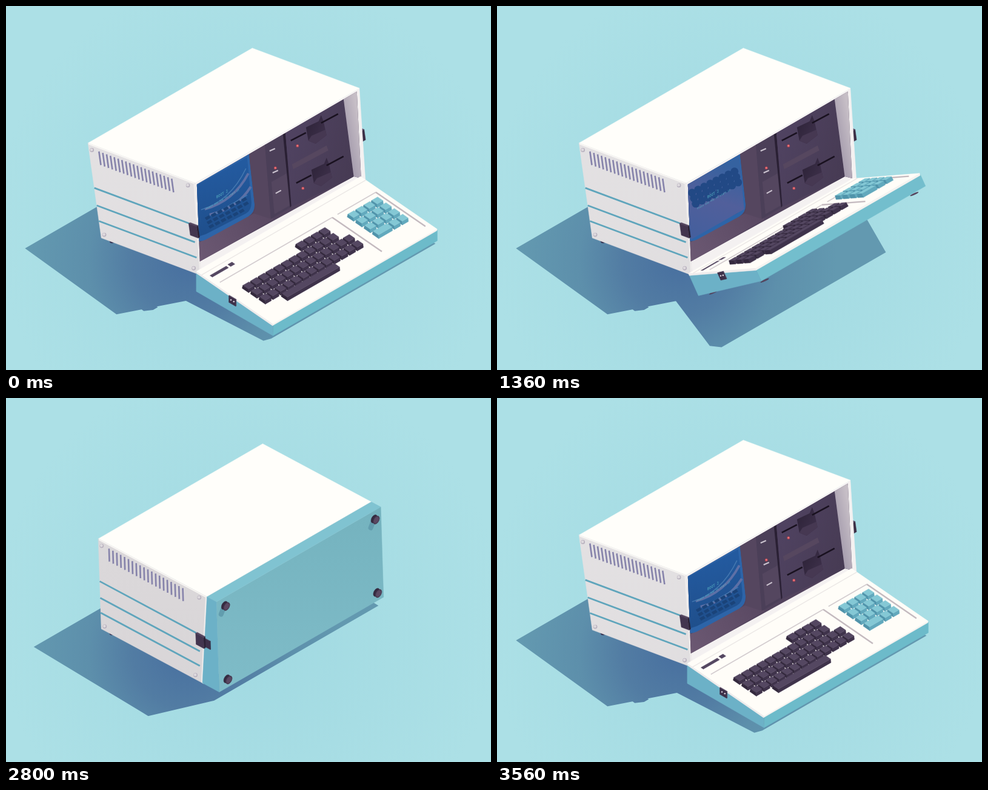
An HTML page with a canvas that plays this animation: 800 px wide and 600 px high, repeating every 4.16 s.

```html
<!DOCTYPE html>
<html lang="en">
<head>
<meta charset="utf-8">
<title>Portable computer</title>
<style>
  html, body { margin: 0; width: 100%; height: 100%; overflow: hidden; background: #abdfe5; }
  canvas { display: block; }
</style>
</head>
<body>
<canvas id="stage" width="800" height="600"></canvas>
<script>
const ctx = document.getElementById('stage').getContext('2d');
const LOOP = 4160, STEP = 40, WIDTH = 313;
const DARK = { top: '#544761', cap: '#33283d', front: '#3f334b' };
const TEAL = { top: '#84c8d5', cap: '#4f93aa', front: '#62a9bd' };
const BODY = [[0, 0], [193, 0], [207, 146], [0, 146]];
const LID = [[193, 0], [225, 0], [225, 146], [207, 146]];
const LATCH = box(186, 61, 201, 79);
let tilt = 10, swing = 100;

const clamp = (x, lo, hi) => Math.min(hi, Math.max(lo, x));

// World axes: a runs up-right, b runs down-right, z is height.
const project = ([a, b, z]) => [157 + .866 * (a + b), 380 + (b - a) / 2 - z];

function rotate([b, z], [cb, cz], degrees) {
  const r = degrees * Math.PI / 180, c = Math.cos(r), s = Math.sin(r);
  b -= cb; z -= cz;
  return [cb + b * c - z * s, cz + b * s + z * c];
}

// Each part places its own (b, z) profile in the world.
const onBody = p => rotate(p, [13, 0], tilt);
const onLid = p => onBody(rotate(p, [189.6, 4.9], -swing));
const onKeys = ([v, h]) => onLid([193 + .095 * v - .995 * h, .995 * v + .095 * h]);
const at = (place, a, b, z) => project([a, ...place([b, z])]);

function box(b0, z0, b1, z1) { return [[b0, z0], [b1, z0], [b1, z1], [b0, z1]]; }

function trace(points) {
  ctx.beginPath();
  points.forEach(p => ctx.lineTo(...p));
}
function fill(points, color) {
  trace(points);
  ctx.closePath();
  ctx.fillStyle = ctx.strokeStyle = color;
  ctx.fill();
  ctx.lineWidth = .5;
  ctx.stroke();
}
function line(points, color, width, cap = 'butt') {
  trace(points);
  ctx.strokeStyle = color;
  ctx.lineWidth = width;
  ctx.lineCap = cap;
  ctx.stroke();
}
function shape(path, color) {
  ctx.fillStyle = color;
  ctx.fill(new Path2D(path));
}
function stroke(path, color, width) {
  ctx.strokeStyle = color;
  ctx.lineWidth = width;
  ctx.stroke(new Path2D(path));
}
function dot(x, y, r, color) {
  ctx.beginPath();
  ctx.arc(x, y, r, 0, 7);
  ctx.fillStyle = color;
  ctx.fill();
}
function gradient(x0, y0, x1, y1, ...colors) {
  const g = ctx.createLinearGradient(x0, y0, x1, y1);
  colors.forEach((c, i) => g.addColorStop(i / (colors.length - 1), c));
  return g;
}

// Extrudes a counterclockwise profile from a0 to a1; draws the coloured faces towards the viewer.
function prism(place, profile, a0, a1, sides, cap) {
  const p = profile.map(place);
  p.forEach((q, i) => {
    const r = p[(i + 1) % p.length];
    if (!sides[i] || r[1] - q[1] <= r[0] - q[0]) return;
    fill([[a0, ...q], [a0, ...r], [a1, ...r], [a1, ...q]].map(project), sides[i]);
  });
  fill(p.map(q => project([a0, ...q])), cap);
}

function hull(points) {
  points = [...points].sort((p, q) => p[0] - q[0] || p[1] - q[1]);
  const half = list => {
    const out = [];
    for (const p of list) {
      while (out.length > 1) {
        const [m, n] = out.slice(-2);
        if ((n[0] - m[0]) * (p[1] - m[1]) - (n[1] - m[1]) * (p[0] - m[0]) > 0) break;
        out.pop();
      }
      out.push(p);
    }
    return out.slice(0, -1);
  };
  return [...half(points), ...half(points.reverse())];
}

function drawShadow() {
  const ground = -4;
  const cast = (place, profile, a0, a1) => {
    const points = profile.map(place).flatMap(([b, z]) => [a0, a1].map(a => {
      const h = z - ground;
      return project([a - .605 * h, b - .219 * h, ground]);
    }));
    hull(points).forEach((p, i) => i ? ctx.lineTo(...p) : ctx.moveTo(...p));
    ctx.closePath();
  };
  ctx.beginPath();
  cast(onBody, BODY, 0, WIDTH);
  cast(onLid, LID, 0, WIDTH);
  cast(onBody, LATCH, -9, 0);
  const g = ctx.createRadialGradient(300, 420, 20, 300, 420, 260);
  g.addColorStop(0, '#4a72a0');
  g.addColorStop(.3, '#527ca3');
  g.addColorStop(.6, '#5d8fab');
  g.addColorStop(1, '#6399b0');
  ctx.fillStyle = g;
  ctx.fill();
}

function drawBody() {
  const open = tilt / 10, tone = l => `hsl(320 4% ${l + 4 * open}%)`;
  const side = (b, z) => at(onBody, 0, b, z);
  dot(...at(onBody, 6, 14, -3), 4, '#2f2c4c');
  prism(onBody, box(183, 61, 198, 77), 314, 319, ['', '#3a2e45', '#5a4b66', ''], '#4b3d5c');
  prism(onBody, BODY, 0, WIDTH, ['', '#f4f1f1', '#fffefa', ''],
    gradient(0, 240, 0, 460, tone(84.5), tone(83.5)));
  line([side(1, 145), side(206, 145)], '#f8f6f3', 2);
  line([side(205.5, 145), side(192, 1)], '#f0edec', 2.5);
  for (let i = 0; i < 20; i++) {
    const b = 20 + i * 7.4;
    line([side(b, 118), side(b, 139)], '#8582aa', 2.6);
  }
  [[77, 184], [50, 190], [26, 189]].forEach(([z, end]) =>
    line([side(0, z), side(end, z)], '#5fa5bc', 2.8));
  [[6, 137], [192, 138], [7, 7], [180, 7]].forEach(([b, z]) => {
    const [x, y] = side(b, z);
    dot(x, y, 3.4, '#b9b2bf');
    dot(x - .5, y - .5, 2.3, '#dedade');
  });
}

function drawScreen(lift) {
  const raised = clamp(lift * 5, 0, 1);
  ctx.save();
  ctx.clip(new Path2D('M314 293L401 243Q406 290 410 324Q412 340 400 347L330 385Q324 388 318 388Z'));
  shape('M300 230H420V400H300Z', '#2d64a8');
  shape('M312 297L398 249Q402 290 405 322Q406 337 396 342L330 376L318 380Z',
    gradient(340, 270, 360, 370, '#235a9f', '#1f4f8c'));

  ctx.globalAlpha = 1 - raised;
  stroke('M328 335Q376 322 400 276M336 344Q382 334 404 298', '#5d70a6', 4);
  stroke('M322 336Q370 322 396 268M342 344L398 312', '#4478b0', 1.5);
  for (let i = 0; i < 20; i++) {
    const x = 328 + i % 7 * 10 + (i / 7 | 0) * 3, y = 349 - i % 7 * 5 + (i / 7 | 0) * 7;
    shape(`M${x} ${y}l7 -4l3 4l-7 4Z`, '#1a4379');
  }

  ctx.globalAlpha = raised;
  const drop = (lift - .3) * 60;
  shape('M312 290L400 248L408 335L320 385Z',
    gradient(380, 260, 340, 380, '#3562a0', '#515f9b', '#455f9d'));
  for (let i = 0; i < 24; i++) {
    const x = 322 + i % 8 * 10, y = 311 - i % 8 * 5 + (i / 8 | 0) * 9 - drop;
    dot(x + (i / 8 | 0) * 3, y, 6.5, '#224985');
  }
  ctx.globalAlpha = 1;
  ctx.fillStyle = '#59b4c4';
  ctx.textAlign = 'center';
  ctx.transform(.866, -.5, .12, 1, 357, 312);
  ctx.font = '6px "DejaVu Sans Mono", monospace';
  ctx.fillText('BOOT 2', 0, 0);
  ctx.font = '4.2px "DejaVu Sans Mono", monospace';
  ctx.fillText('Press any key to start it', 0, 8);
  ctx.restore();
}

function drawDrive(x, y) {
  ctx.save();
  ctx.translate(x, y);
  shape('M25 -22L46 -32L50 -42L54 -32L59 -9L41 5L29 0Z', gradient(26, -20, 56, -6, '#30253b', '#3d304a'));
  shape('M29 0L34 -8L57 -18L59 -9L41 5Z', '#463852');
  stroke('M0 0L25 -13M50 -29L78 -44', '#19111f', 2.8);
  dot(11, 8.5, 2.5, '#a94452');
  dot(11, 8.5, 1.4, '#f17a7d');
  ctx.restore();
}

// Drawn in screen space for the fully tilted pose and shifted along with the front edge.
function drawInterior(lift) {
  const [x, y] = at(onBody, 0, 207, 146);
  ctx.save();
  ctx.translate(x - 312, y - 292);
  ctx.clip(new Path2D('M315 294L579 141L586 284L574 281L320 421Z'));
  shape('M300 130H600V430H300Z', '#52435d');
  shape('M318 390L411 341L442 351L318 424Z', gradient(320, 410, 430, 345, '#6b5872', '#5a4963'));
  drawScreen(lift);
  shape('M401 243L429 226L438 351L409 342Q412 335 410 324Z', '#55465f');
  shape('M427 226L458 209L471 331L437 351Z', '#4b3f58');
  shape('M438 290L463 276L468 329L443 343Z', '#54465f');
  shape('M457 211L461 208L472 328L469 332Z', '#2a2034');
  shape('M461 207L557 152L574 282L471 331Z', gradient(470, 230, 570, 260, '#4f4260', '#473b54'));
  shape('M472 261L529 230L532 238L474 269Z', '#56475f');
  drawDrive(470, 222);
  drawDrive(479, 292);
  stroke('M435 239l9 -4M440 275l9 -4M445 309l9 -5', '#cbc3cf', 2.2);
  dot(444.5, 267, 2.5, '#a94452');
  dot(444.5, 267, 1.4, '#f17a7d');
  shape('M557 153L581 138L588 286L574 282Z', gradient(560, 200, 584, 195, '#a9a0b0', '#c6bec6'));
  ctx.restore();
}

function drawKey(u, v, color, units = 1) {
  const profile = [[v - 6.2, 1], [v + 6.2, 1], [v + 4.9, 6.5], [v - 5.3, 6.5]];
  prism(onKeys, profile, u - 5.8, u + 5.8 + (units - 1) * 14.7,
    ['', color.front, color.top, color.cap], color.cap);
}

function drawKeyboard() {
  const on = (u, v) => at(onKeys, u, v, 1);
  const patch = (u0, v0, u1, v1) =>
    fill([on(u0, v0), on(u1, v0), on(u1, v1), on(u0, v1)], DARK.top);
  line([on(0, 10), on(WIDTH, 10)], '#ece8e6', 1.5);
  [[8, 222], [232, 305]].forEach(([left, right]) => {
    line([on(left, 37), on(right, 37)], '#d3cccf', 1.6);
    line([on(right, 37), on(right, 132)], '#c4babf', 2.4);
  });
  patch(8, 18, 39, 22.5);
  patch(43, 17, 51, 22.5);

  const rows = [[8, 11], [0, 11], [0, 12], [0, 12]];
  rows.forEach(([first, last], row) => {
    const v = 55.5 + row * 16;
    for (let i = 3; i >= 0; i--) {
      const wide = row === 3 && i === 0;
      if (row === 3 && i === 1) continue;
      drawKey(244 + i * 15, v, TEAL, wide ? 2 : 1);
    }
    for (let i = last; i >= first; i--) drawKey(28 + i * 14.6, v, DARK);
  });
  drawKey(56, 118, DARK, 7);
}

function drawFeet() {
  for (const a of [300, 15]) for (const z of [133, 14]) {
    const disk = (b, r) => Array.from({ length: 24 }, (_, i) =>
      at(onLid, a + r * Math.cos(i * Math.PI / 12), b, z + r * Math.sin(i * Math.PI / 12)));
    if (swing < 50 && z > 20)
      line([at(onLid, a, 225, z), at(onLid, a - 7, 225, z - 11)], '#629dae', 8, 'round');
    fill(disk(225, 6), '#352a40');
    fill(disk(229, 6), '#46384f');
    fill(disk(229, 4.6), '#5a4862');
  }
}

function drawLid() {
  const [b0, z0] = onKeys([0, 0]), [b1, z1] = onKeys([146, 0]);
  const innerVisible = b1 - b0 > z1 - z0;
  const shell = () => prism(onLid, LID, 0, WIDTH,
    ['#7cbccb', gradient(0, 190, 0, 490, '#75b3bf', '#7fbcc8'),
      `hsl(190 47% ${66 - swing * .05}%)`, '#fffdf9'], '#6cb1c7');
  const plate = () => prism(onKeys, box(0, -2, 146, 1), 0, WIDTH,
    ['', '#f5f3f0', '#fffdf8', '#eeeaea'], '#efecec');

  if (innerVisible) {
    drawFeet();
    shell();
    plate();
    drawKeyboard();
  } else {
    plate();
    shell();
    drawFeet();
  }
  prism(onLid, box(200, 63, 211, 76), -1, 0, ['', '#2f2539', '#4e405a', '#4e405a'], '#3d3049');
  if (innerVisible) [67, 72.5].forEach(z => dot(...at(onLid, -1, 205, z), 1.3, '#d4ccd6'));
}

function draw(time) {
  const t = Math.floor(time % LOOP / STEP) * STEP;
  const phase = t < 2000 ? clamp(t - 1000, 0, 800) : clamp(3560 - t, 0, 800);
  const lift = Math.min(1, phase / 570) ** 2.28;
  swing = 100 * (1 - lift);
  tilt = 10 * (1 - clamp((phase - 440) / 360, 0, 1) ** 2);

  const glow = ctx.createRadialGradient(400, 380, 60, 400, 360, 420);
  glow.addColorStop(0, '#a2dae2');
  glow.addColorStop(1, '#ace0e6');
  ctx.fillStyle = glow;
  ctx.fillRect(0, 0, 800, 600);
  drawShadow();
  drawBody();
  if (lift < 1) drawInterior(lift);
  drawLid();
  prism(onBody, LATCH, -3, 0, ['', '#2a2034', '#54455f', '#54455f'], '#43354f');
}

const start = performance.now();
(function tick() {
  draw(performance.now() - start);
  requestAnimationFrame(tick);
})();
</script>
</body>
</html>
```
